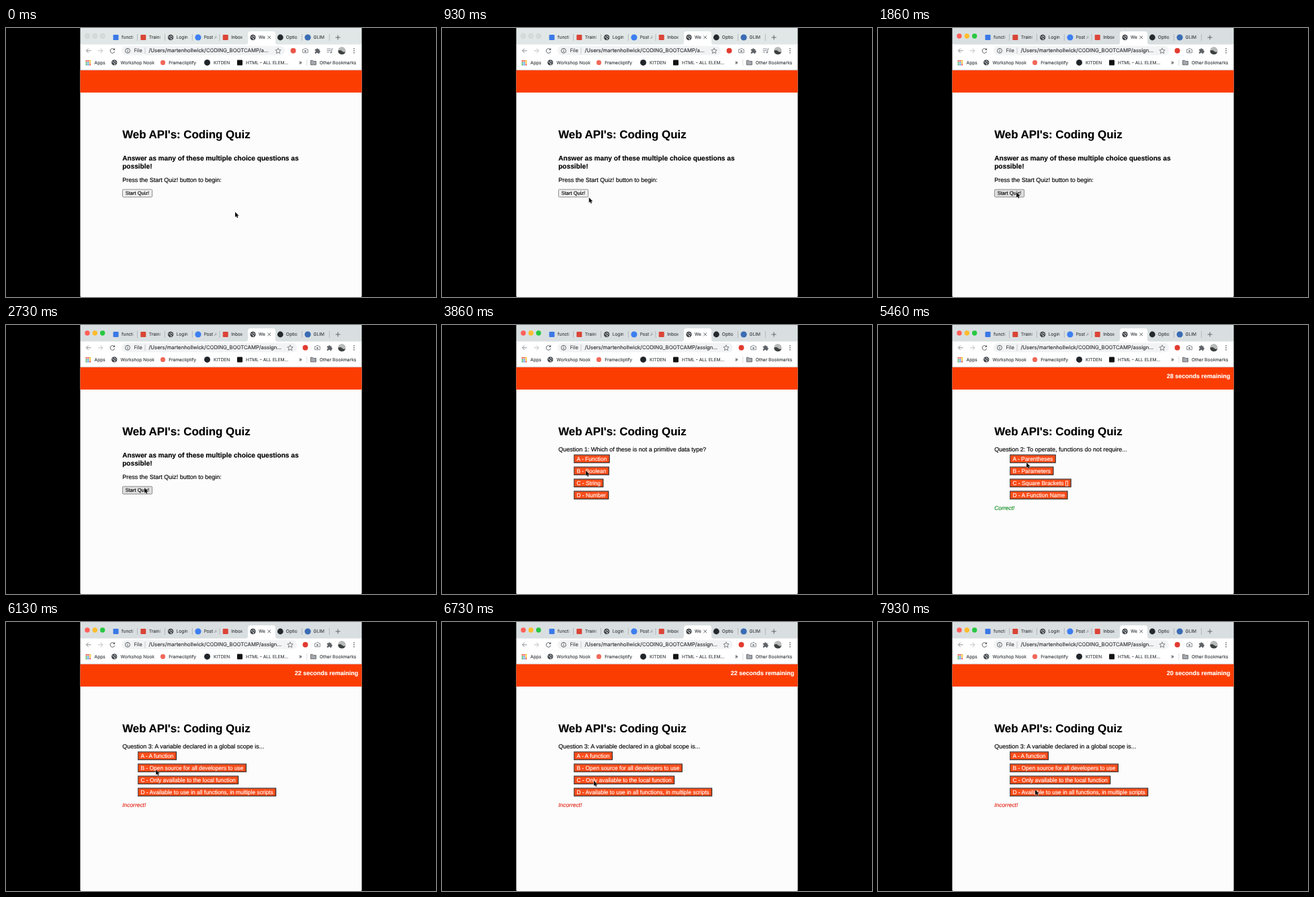
An HTML page for the animation above (8 s loop, 640 by 400 pixels).

```html
<!DOCTYPE html>
<html lang="en">
<head>
<meta charset="utf-8">
<title>Coding quiz</title>
<style>
  html, body { margin: 0; width: 100%; height: 100%; overflow: hidden; background: #000; }
  svg { display: block; width: 100vw; height: 100vh; --bar: #d9dfe1; }
  text { white-space: pre; text-rendering: geometricPrecision; fill: currentColor; stroke: currentColor; stroke-width: .15; }
  .page text { font-family: "Liberation Sans", Arial, sans-serif; color: #000; }
  .chrome text { font: 6.65px Inter, Roboto, sans-serif; color: #44484c; }
  .page .answer { color: #fff; font-size: 8.44px; }
  .line { fill: none; stroke: #5f6368; stroke-width: 1; }
</style>
</head>
<body>
<svg id="stage" viewBox="0 0 640 400" xmlns="http://www.w3.org/2000/svg"></svg>
<script>
const LOOP = 8000;
const RECORDING = 100, FOCUS = 1800, START = 2900, ANSWER_1 = 4450, ANSWER_2 = 5750, FIRST_TICK = 3900;

const QUESTIONS = [
  ["Which of these is not a primitive data type?",
    "Function", "Boolean", "String", "Number"],
  ["To operate, functions do not require...",
    "Parentheses", "Parameters", "Square Brackets []", "A Function Name"],
  ["A variable declared in a global scope is...",
    "A function", "Open source for all developers to use",
    "Only available to the local function",
    "Available to use in all functions, in multiple scripts"]
];

// time, x, y of the pointer tip
const POINTER = [
  [0, 341, 273.5], [400, 341, 273.5], [930, 218.7, 252], [1200, 206, 250.5], [1260, 206, 250],
  [1600, 206, 250], [2000, 206, 242], [2950, 206, 242], [3860, 214, 216.5],
  [4400, 220, 199], [4900, 220, 199], [5460, 221, 204.5], [5800, 222, 213],
  [6730, 226, 236], [7930, 234, 249.5], [8000, 234, 249.5]
];

const text = (x, y, s, attrs = "") => `<text x="${x}" y="${y}" ${attrs}>${s}</text>`;
const rect = (x, y, w, h, fill, attrs = "") =>
  `<rect x="${x}" y="${y}" width="${w}" height="${h}" fill="${fill}" ${attrs}/>`;
const disc = (x, y, r, fill, attrs = "") => `<circle cx="${x}" cy="${y}" r="${r}" fill="${fill}" ${attrs}/>`;
const path = (d, attrs = 'class="line"') => `<path d="${d}" ${attrs}/>`;
const square = (x, y, fill) => rect(x - 4, y - 4, 8, 8, fill, 'rx="1"');

const globe = (x, y) => disc(x, y, 4.2, "#404448") +
  path(`M${x - 3} ${y - 1}q2 0 2.4 1.5t2 1.2l-1 1.8M${x + .3} ${y - 3}q-.6 1.6 .8 1.7t2 1.4`,
    'fill="none" stroke="#e4e6e8" stroke-width="1"');

function tabs() {
  const items = [
    ["functi", x => square(x, 14, "#3b78e7")],
    ["Traini", x => square(x, 14, "#d94436")],
    ["Login", x => globe(x, 14)],
    ["Post A", x => disc(x, 14, 4.6, "#3d7ff0")],
    ["Inbox", x => square(x, 14, "#dc4437")],
    ["We", x => globe(x, 14)],
    ["Optio", x => disc(x, 14, 4.4, "#24292e")],
    ["GLIM", x => disc(x, 14, 4.6, "#3a6cb4")]
  ];
  return items.map(([label, icon], i) => {
    const x = 163.5 + i * 40.8, active = i === 5, width = active ? 12 : 19;
    return icon(x) +
      `<svg x="${x + 8.5}" y="5" width="${width}" height="18">${text(0, 11.3, label)}</svg>` +
      rect(x + width + 4.5, 8, 4, 12, active ? "url(#fadeTab)" : "url(#fadeBar)") +
      (i === 4 || active ? "" : rect(x + 31.8, 9, .6, 10, "#9a9da2"));
  }).join("");
}

function browser() {
  const grid = ["#e94335", "#e94335", "#f4b400", "#34a853", "#4285f4", "#f4b400", "#34a853", "#4285f4", "#e94335"]
    .map((c, i) => rect(118.6 + i % 3 * 2.8, 47.9 + Math.floor(i / 3) * 2.8, 2, 2, c)).join("");
  const lights = [121, 132.3, 143.7].map(x => disc(x, 12, 3.7, "#ccc", 'class="light"')).join("");
  const camera = path("M-3.8-2h2l1-1.4h1.8l1 1.4h1.8v5h-7.6z", 'fill="none" stroke="#777b80" stroke-width=".9"') +
    disc(0, .5, 1.4, "#777b80");
  const puzzle = path("M-3.7-2.2h2.2a1.3 1.3 0 1 1 2.6 0h1.9v2.2a1.3 1.3 0 1 1 0 2.6v1.6h-2.3a1.2 1.2 0 0 0-2.4 0h-2v-2.2a1.2 1.2 0 0 0 0-2.4z",
    'fill="#5f6368"');
  return `<g class="chrome">
    ${rect(110.5, 0, 419, 25, "var(--bar)")}
    ${path("M356 25q4 0 4-4v-12q0-4 4-4h33q4 0 4 4v12q0 4 4 4z", 'fill="#fff"')}
    ${rect(110.5, 24.5, 419, 38, "#fff")}
    ${lights}${tabs()}
    ${path("M389.4 11.6l4.6 4.6m0-4.6l-4.6 4.6")}
    ${path("M490.5 14h7m-3.5-3.5v7")}
    ${path("M126.5 33.8h-7m3.3-3.3l-3.3 3.3 3.3 3.3", 'class="line" style="stroke:#8b8f94"')}
    ${path("M137 33.8h7m-3.3-3.3l3.3 3.3-3.3 3.3", 'class="line" style="stroke:#bcbfc3"')}
    ${path("M161.3 32a3.4 3.4 0 1 0 .5 2.8")}${path("M162.2 29.8v3.3h-3.3z", 'fill="#5f6368"')}
    ${rect(172, 26.8, 243, 13.6, "#f1f3f4", 'rx="6.8" id="pill"')}
    ${disc(181, 33.8, 3.5, "none", 'class="line"')}${rect(180.5, 33.2, 1, 2.6, "#5f6368")}${rect(180.5, 31.5, 1, 1, "#5f6368")}
    ${text(190.5, 36.4, "File", 'style="font-size:7.4px"')}
    ${rect(206.7, 29, .6, 9.5, "#aeb1b5")}
    ${text(212.5, 36.4, "", 'id="url" style="font-size:7.75px;color:#303438"')}
    <g id="star">${path("M0-4l1.2 2.7 2.9.3-2.2 2 .7 2.9L0 2.4l-2.6 1.5.7-2.9-2.2-2 2.9-.3z", 'class="line" style="stroke-width:.8"')}</g>
    <g id="recorder">${disc(0, 0, 4, "#ea5546")}</g>
    <g id="camera">${camera}</g>
    <g id="puzzle">${puzzle}</g>
    <g id="playlist">${path("M477.5 31h6m-6 2.5h6m-6 2.5h3.5m3.8-5v5.2m0-5.2h2", 'class="line" style="stroke:#8b8f94"')}${disc(483.7, 36.2, 1.2, "#8b8f94")}</g>
    ${disc(499.8, 33.8, 5.7, "#b9bbbb")}${path("M494.2 34q3-2 6 .5t5.2.5a5.7 5.7 0 0 1-11.2-1z", 'fill="#3c4040"')}
    ${[30.8, 33.8, 36.8].map(y => disc(518, y, .9, "#5f6368")).join("")}
    ${grid}${text(131.6, 53.8, "Apps")}
    ${globe(161.2, 51.4)}${text(170.5, 53.8, "Workshop Nook")}
    ${disc(233.5, 51.4, 3.6, "#f0695a")}${text(242.3, 53.8, "Framecliptify")}
    ${disc(299.5, 51.4, 4.5, "#20252a")}${text(309, 53.8, "KITDEN")}
    ${square(348, 51.4, "#111")}${text(357, 53.8, "HTML - ALL ELEM...")}
    ${text(436, 53.8, "»", 'style="font-size:8px"')}
    ${rect(447.6, 46.5, .6, 10, "#c4c7ca")}
    ${path("M453.4 48.2h3l1 1.2h4v5.4h-8z", 'fill="#a4a8ac" stroke="#5f6368" stroke-width=".9"')}${text(466.7, 53.8, "Other Bookmarks")}
    ${rect(110.5, 61.8, 419, .7, "#d5d7da")}
  </g>`;
}

function question([prompt, ...answers], i) {
  const rows = answers.map((answer, row) => `<g class="option" transform="translate(196 ${192.7 + row * 18})">
    <rect width="54" height="12.6" fill="#222"/>
    <path fill="#5c5252"/>
    <rect x="1.1" y="1.1" height="10.4" fill="#fd4d1a"/>
    ${text(4.4, 9.3, "ABCD"[row] + " - " + answer, 'class="answer"')}</g>`).join("");
  return `<g class="question">${text(173.2, 187.6, `Question ${i + 1}: ${prompt}`, 'font-size="9"')}${rows}</g>`;
}

function page() {
  return `<g class="page">
    ${rect(110.5, 62.5, 419, 337.5, "#fcfcfc", 'rx="1.5"')}
    ${rect(110.5, 62.5, 419, 33.5, "#fc3d02")}
    ${text(524.3, 79, "", 'id="timer" font-size="9" font-weight="bold" text-anchor="end" style="color:#fff"')}
    ${text(173.2, 164.4, "Web API's: Coding Quiz", 'font-size="16.875" font-weight="bold"')}
    <g id="intro">
      <g font-size="10.125" font-weight="bold">
        ${text(173.2, 197.3, "Answer as many of these multiple choice questions as")}
        ${text(173.2, 209, "possible!")}
      </g>
      ${text(173.2, 228.5, "Press the Start Quiz! button to begin:", 'font-size="9"')}
      ${rect(173.5, 240.1, 44, 11.2, "#efefef", 'id="start" stroke="#767676" stroke-width=".8" rx="1"')}
      ${text(195.5, 248.3, "Start Quiz!", 'font-size="7.5" text-anchor="middle"')}
    </g>
    ${QUESTIONS.map(question).join("")}
    ${text(173.2, 275.2, "", 'id="verdict" font-size="8.44" font-style="italic"')}
  </g>`;
}

const fade = (id, color) => `<linearGradient id="${id}">
  <stop offset="0" style="stop-color:${color};stop-opacity:0"/><stop offset="1" style="stop-color:${color}"/></linearGradient>`;

const stage = document.getElementById("stage");
stage.innerHTML = `<defs>${fade("fadeBar", "var(--bar)")}${fade("fadeTab", "#fff")}</defs>` +
  rect(0, 0, 640, 400, "#000") + page() + browser() +
  `<g id="pointer">${path("M0 0v7.8l1.8-1.6 1.2 2.7 1.4-.6-1.2-2.6h2.5z",
    'fill="#111" stroke="#fff" stroke-width=".7" paint-order="stroke"')}</g>`;

const el = id => document.getElementById(id);
const questions = [...stage.querySelectorAll(".question")];
const lights = [...stage.querySelectorAll(".light")];
const show = (node, on) => node.setAttribute("display", on ? "inline" : "none");
const place = (node, x, y) => node.setAttribute("transform", `translate(${x} ${y})`);

// Answer buttons hug their labels.
function fitButtons() {
  for (const option of stage.querySelectorAll(".option")) {
    const [outer, face] = option.querySelectorAll("rect");
    const width = option.querySelector("text").getComputedTextLength() + 8.8;
    outer.setAttribute("width", width);
    face.setAttribute("width", width - 2.2);
    option.querySelector("path").setAttribute("d", `M0 12.6V0H${width}l-1.1 1.1H1.1v10.4z`);
  }
}

function pointerAt(t) {
  const i = Math.max(1, POINTER.findIndex(key => key[0] > t));
  const [t0, x0, y0] = POINTER[i - 1], [t1, x1, y1] = POINTER[i];
  const p = (t - t0) / (t1 - t0), k = p * p * (3 - 2 * p);
  return [x0 + (x1 - x0) * k, y0 + (y1 - y0) * k];
}

function timerText(t) {
  if (t < FIRST_TICK) return "";
  const ticks = Math.floor((t - FIRST_TICK) / 1000);
  return `${29 - ticks - (ticks > 1 ? 5 : 0)} seconds remaining`;
}

function render(t) {
  const focused = t >= FOCUS, shift = focused ? 18 : 0;
  stage.style.setProperty("--bar", focused ? "#d9dfe1" : "#e0e7e6");
  lights.forEach((light, i) => {
    light.setAttribute("fill", focused ? ["#ff5f57", "#febc2e", "#28c840"][i] : "#d5dada");
    light.setAttribute("stroke", focused ? "none" : "#c8cdcd");
    light.setAttribute("stroke-width", .5);
  });
  el("pill").setAttribute("width", 243 + shift);
  el("url").textContent = "/Users/martenhollwick/CODING_BOOTCAMP/" + (focused ? "assign..." : "a...");
  place(el("star"), 405 + shift, 33.8);
  place(el("recorder"), 427.5 + shift, 33.8);
  place(el("camera"), 445.5 + shift, 33.8);
  place(el("puzzle"), 463.5 + shift, 33.8);
  el("recorder").firstChild.setAttribute("fill", t < RECORDING ? "#ea5546" : "#e23b30");
  show(el("playlist"), !focused);

  const step = [START, ANSWER_1, ANSWER_2].filter(time => t >= time).length;
  show(el("intro"), step === 0);
  questions.forEach((node, i) => show(node, step === i + 1));
  el("start").setAttribute("fill", focused ? "#dedede" : "#efefef");
  el("verdict").textContent = ["", "", "Correct!", "Incorrect!"][step];
  el("verdict").style.color = step === 2 ? "#0b8a1c" : "#e3261b";
  el("timer").textContent = timerText(t);
  place(el("pointer"), ...pointerAt(t));
}

fitButtons();
const began = performance.now();
function frame() {
  render((performance.now() - began) % LOOP);
  requestAnimationFrame(frame);
}
frame();
</script>
</body>
</html>
```
